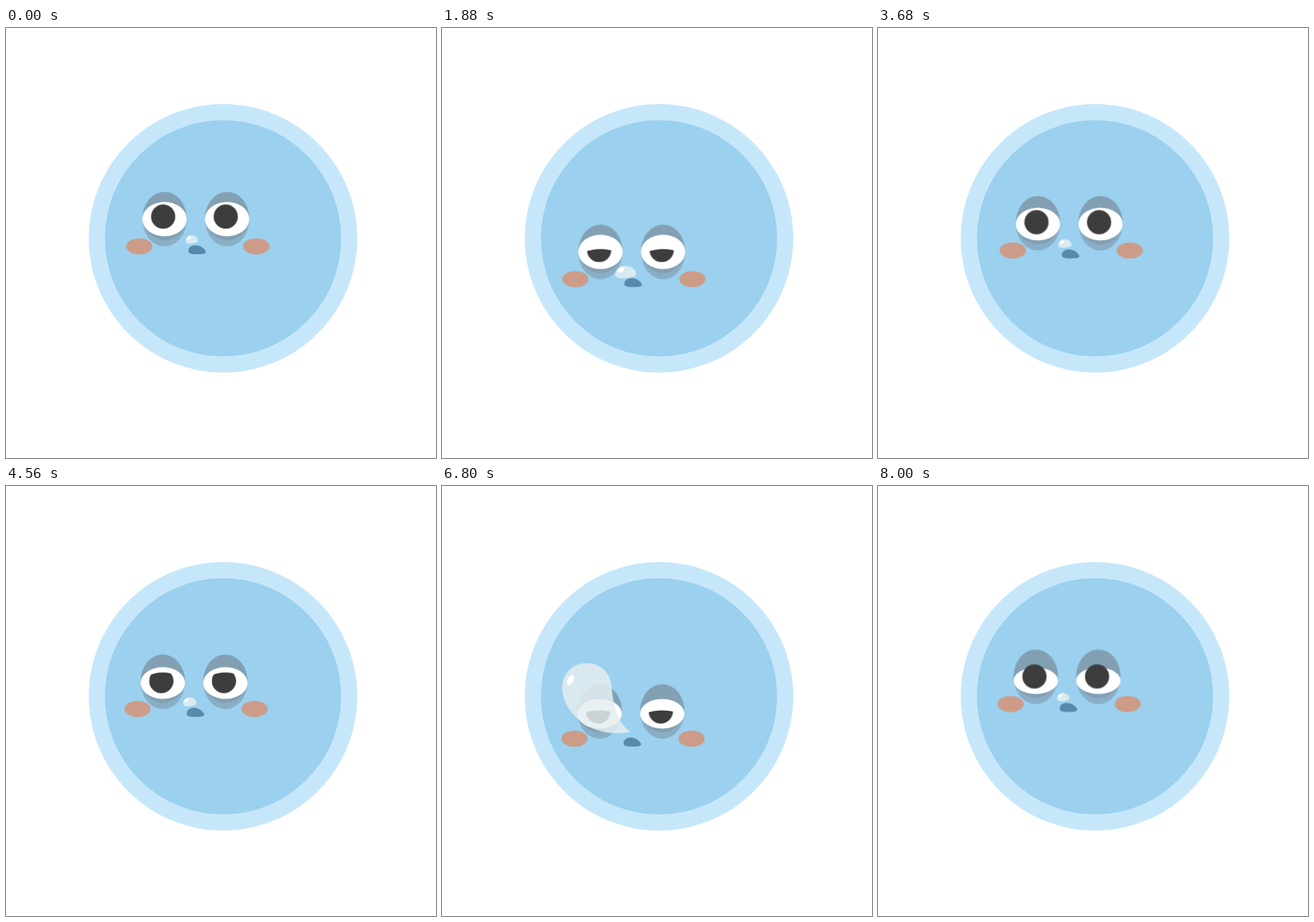
Write an HTML page without scripts that moves like this. It is 639 px wide and 639 px high and loops after 8040 ms.

```html
<!DOCTYPE html>
<html lang="en">
<head>
<meta charset="utf-8">
<title>Sleepy face</title>
<style>
html, body { margin: 0; width: 100%; height: 100%; overflow: hidden; background: #fff; }
svg { display: block; width: 100vw; height: 100vh; }
.sway, .nod, .lid, .pupil, .puff, .film, .shine { animation: 8040ms linear infinite; }
.sway { animation-name: sway; }
.nod { animation-name: nod; }
.lid { animation-name: lid; transform-origin: 0 25.5px; }
.pupil { animation-name: look; }
.puff { animation-name: puff; }
.film { animation-name: film; }
.shine { animation-name: shine; }

@keyframes sway {
  0% { transform: translateX(0); animation-timing-function: ease-in-out; }
  5% { transform: translateX(2.5px); animation-timing-function: ease-in-out; }
  12.94% { transform: translateX(-.3px); }
  16.2% { transform: translateX(-.8px); }
  21.4% { transform: translateX(0); }
  34.83% { transform: translateX(.4px); }
  41.8% { transform: translateX(1.3px); }
  47.3% { transform: translateX(2.5px); }
  52.2% { transform: translateX(1.8px); }
  56.72% { transform: translateX(-2.5px); }
  62.7% { transform: translateX(-5px); }
  68.66% { transform: translateX(-5px); }
  73.1% { transform: translateX(-2.8px); }
  78.4% { transform: translateX(-2px); }
  84.58% { transform: translateX(-1.2px); }
  94.5% { transform: translateX(-2px); }
  99.5%, 100% { transform: translateX(-1px); }
}
@keyframes nod {
  0% { transform: translateY(0); animation-timing-function: ease-in-out; }
  4.4% { transform: translateY(-4.5px); animation-timing-function: ease-in; }
  10.45% { transform: translateY(13px); }
  12.94% { transform: translateY(23.3px); animation-timing-function: cubic-bezier(.3, .55, .6, 1); }
  20.9% { transform: translateY(49px); }
  25% { transform: translateY(48.5px); }
  28.6% { transform: translateY(47px); }
  31.4% { transform: translateY(42.8px); }
  34.83% { transform: translateY(29.8px); }
  38% { transform: translateY(20px); }
  41.8% { transform: translateY(12.8px); animation-timing-function: ease-out; }
  53.2% { transform: translateY(-.3px); animation-timing-function: ease-in; }
  56.72% { transform: translateY(6.8px); }
  62.7% { transform: translateY(29px); animation-timing-function: cubic-bezier(.3, .45, .6, 1); }
  68.66% { transform: translateY(50.5px); }
  84.58% { transform: translateY(51px); animation-timing-function: cubic-bezier(.4, 0, .7, .7); }
  94.3% { transform: translateY(13px); animation-timing-function: ease-out; }
  99.5%, 100% { transform: translateY(-.5px); }
}
@keyframes lid {
  0%, 5% { transform: scaleY(1); }
  12.94% { transform: scaleY(.863); }
  20.4% { transform: scaleY(.62); }
  23.6% { transform: scaleY(.58); }
  29.9% { transform: scaleY(.62); }
  34.83% { transform: scaleY(.725); }
  41.8% { transform: scaleY(.9); }
  47.3%, 51% { transform: scaleY(1); }
  53.5% { transform: scaleY(.94); }
  56.72% { transform: scaleY(.77); }
  62.7% { transform: scaleY(.6); }
  68.66%, 84.58% { transform: scaleY(.53); }
  94.5%, 100% { transform: scaleY(1); }
}
@keyframes look {
  0% { transform: translate(-2px, -4px); }
  12.94% { transform: translate(-2.3px, 0); }
  34.83% { transform: translate(.5px, -3.5px); }
  50% { transform: translate(1px, -2px); }
  56.72% { transform: translate(-.2px, -1.5px); }
  68.66% { transform: translate(1px, -3.5px); }
  84.58% { transform: translate(2px, -8.5px); }
  94.5% { transform: translate(1px, -2px); }
  99.5%, 100% { transform: translate(0, -.5px); }
}
@keyframes puff {
  0% { transform: scale(1); }
  12.94% { transform: scale(1.22, 1.12); }
  23.6% { transform: scale(1.7, 1.5); }
  34.83% { transform: scale(1.33, 1.2); }
  49% { transform: scale(1); }
  56.72% { transform: scale(1.1, 1.05); }
  62.7% { transform: scale(.98, .87); }
  68.66% { transform: scale(1); }
  73.1% { transform: scale(1, 1.05); }
  78.4% { transform: scale(.99, 1.1); }
  83.1% { transform: scale(1, 1.03); }
  84.58% { transform: scale(.957, .965); }
  93.3%, 100% { transform: scale(1); }
}
@keyframes film {
  0%, 56.72%, 93.3%, 100% { d: path("M3 4C5 2 4 -2 3 -3C0 -6 -3 -6.5 -5 -6.5C-11 -6.5 -14 -2 -14 2C-14 8 -3 6 3 4Z"); }
  62.7%, 84.58% { d: path("M0 0C-21 -15 -27 -44 -29 -70C-31 -93 -48 -106 -68 -106C-90 -106 -106 -89 -106 -68C-106 -31 -61 12 0 0Z"); }
}
@keyframes shine {
  0%, 56.72%, 93.3%, 100% { transform: translate(-9px, -2.5px) rotate(55deg) scale(.45, .38); }
  62.7%, 84.58% { transform: translate(-93px, -80px) rotate(25deg) scale(1); }
}
</style>
</head>
<body>
<svg viewBox="0 0 639 639">
  <defs>
    <clipPath id="open"><ellipse class="lid" rx="33" ry="25.5"/></clipPath>
    <clipPath id="socket"><ellipse rx="33" ry="40.5"/></clipPath>
    <g id="eye">
      <ellipse rx="33" ry="40.5" fill="#89aec5"/>
      <ellipse cy="-4.5" rx="33" ry="36" fill="#83a0b3" clip-path="url(#socket)"/>
      <ellipse class="lid" rx="33" ry="25.5" fill="#fff"/>
      <g clip-path="url(#open)"><circle class="pupil" r="18" fill="#3d3d3d"/></g>
    </g>
  </defs>

  <circle cx="322.5" cy="312.5" r="199.5" fill="#c6e7fa"/>
  <circle cx="322.5" cy="312.5" r="175.5" fill="#9bd0ef"/>

  <g class="sway"><g class="nod">
    <use href="#eye" transform="translate(235.5 284)"/>
    <use href="#eye" transform="translate(328.5 284)"/>
    <g fill="#cc9c88">
      <ellipse cx="198" cy="324.5" rx="19.5" ry="12"/>
      <ellipse cx="372" cy="324.5" rx="19.5" ry="12"/>
    </g>
    <path fill="#568aab" d="M271 331.5C271 326 276 322.7 282 322.7C290 323 297 329.5 297 333C297 335.8 290 336.2 284 336.2C276 336.2 271 335.5 271 331.5Z"/>
    <g transform="translate(281 314.5)"><g class="puff">
      <path class="film" fill="#e4eef0" fill-opacity=".85" d="M3 4C5 2 4 -2 3 -3C0 -6 -3 -6.5 -5 -6.5C-11 -6.5 -14 -2 -14 2C-14 8 -3 6 3 4Z"/>
      <ellipse class="shine" rx="4.6" ry="8.6" fill="#fff"/>
    </g></g>
  </g></g>
</svg>
</body>
</html>
```
